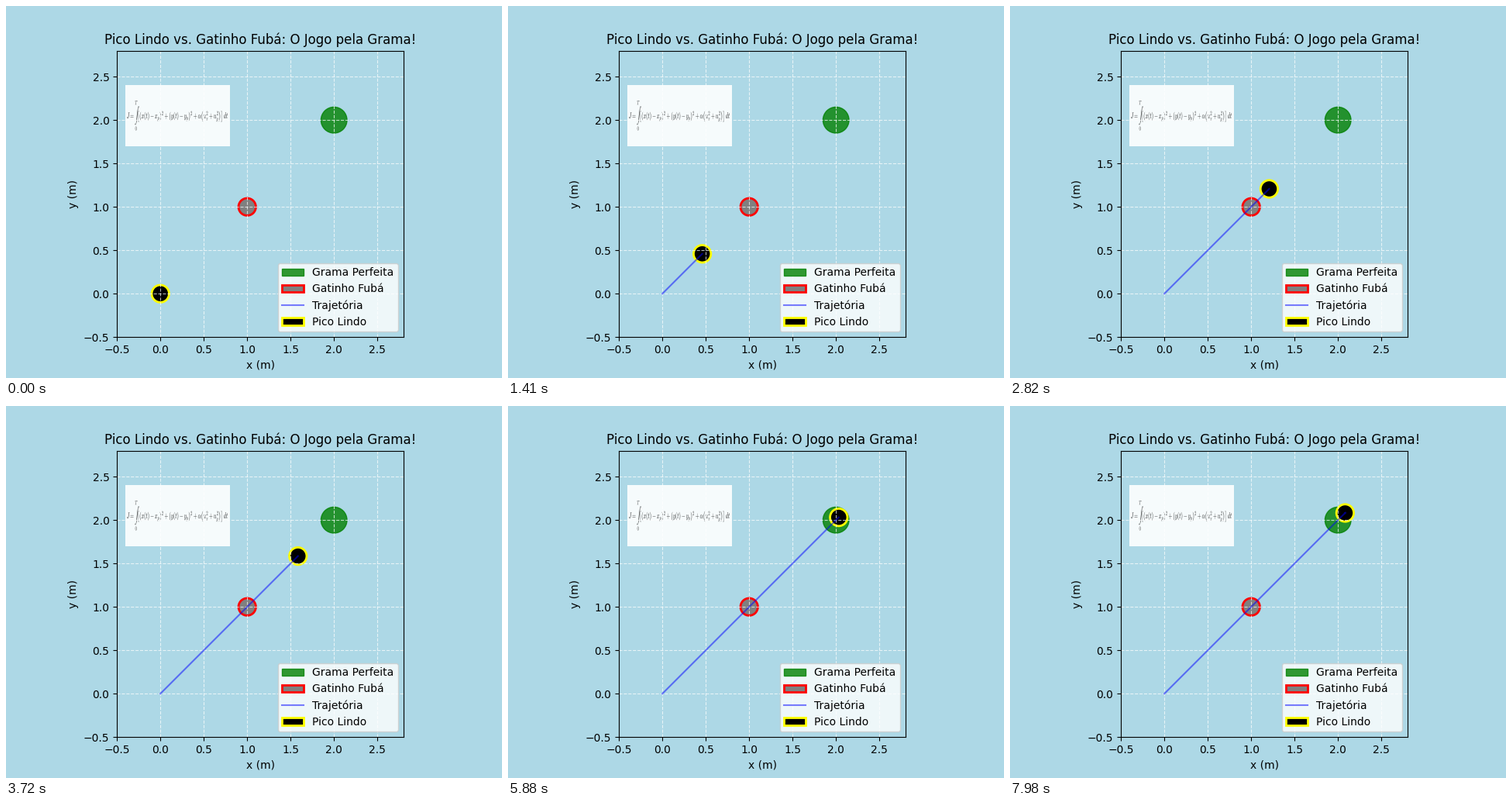
A matplotlib script that plays this animation: 640 px wide and 480 px high, repeating every 8 s.

```python
import numpy as np
import matplotlib.pyplot as plt
from matplotlib.animation import FuncAnimation
from matplotlib.patches import Circle, PathPatch, Rectangle
from matplotlib.textpath import TextPath
from matplotlib.transforms import Affine2D

plt.rcParams["mathtext.fontset"] = "cm"

LOOP_MS = 8000
FRAMES = 267
STEP = 0.03     # seconds of motion per frame
GOAL = 2.0
RATE = 0.426    # decay rate and angular frequency of the controlled motion

FORMULA = (r"$J = \underset{0}{\overset{T}{\int}} \left[\left(x(t) - x_p\right)^2"
           r" + \left(y(t) - y_p\right)^2"
           r" + \alpha\left(u_x^2 + u_y^2\right)\right]\, dt$")


def position(t):
    """Damped approach to the goal, starting at rest, with a small overshoot."""
    p = RATE * t
    return GOAL * (1 - np.exp(-p) * (np.cos(p) + np.sin(p)))


def add_formula(ax, x0, y0, x1, y1):
    """Place the formula so that it spans the given data box."""
    path = TextPath((0, 0), FORMULA, size=20)
    box = path.get_extents()
    fit = (Affine2D().translate(-box.x0, -box.y0)
           .scale((x1 - x0) / box.width, (y1 - y0) / box.height)
           .translate(x0, y0))
    ax.add_patch(PathPatch(fit.transform_path(path), fc="black", lw=0,
                           alpha=0.8, zorder=0.5))


fig, ax = plt.subplots(figsize=(6.4, 4.8), dpi=100, facecolor="lightblue")
ax.set_facecolor("lightblue")
ax.set_aspect("equal")
ax.set_xlim(-0.5, 2.8)
ax.set_ylim(-0.5, 2.8)
ax.set_xlabel("x (m)")
ax.set_ylabel("y (m)")
ax.set_title("Pico Lindo vs. Gatinho Fubá: O Jogo pela Grama!")
ax.grid(True, linestyle="--", color="white", alpha=0.7)

ax.add_patch(Rectangle((-0.4, 1.7), 1.2, 0.7, fc="white", lw=0, alpha=0.9,
                       zorder=0))
add_formula(ax, -0.385, 1.88, 0.775, 2.225)

ax.add_patch(Circle((GOAL, GOAL), 0.15, color="green", alpha=0.8,
                    label="Grama Perfeita"))
ax.add_patch(Circle((1, 1), 0.1, fc="gray", ec="red", lw=2,
                    label="Gatinho Fubá"))
trail, = ax.plot([], [], color="blue", alpha=0.5, label="Trajetória")
runner = ax.add_patch(Circle((0, 0), 0.1, fc="black", ec="yellow", lw=2,
                             label="Pico Lindo"))
ax.legend(loc="lower right")


def update(i):
    s = position(STEP * np.arange(max(i, 1)))
    trail.set_data(s, s)
    runner.center = s[-1], s[-1]
    return trail, runner


def reset():
    return update(0)


anim = FuncAnimation(fig, update, frames=FRAMES, init_func=reset,
                     interval=LOOP_MS / FRAMES, repeat=True, repeat_delay=0)
plt.show()
```
